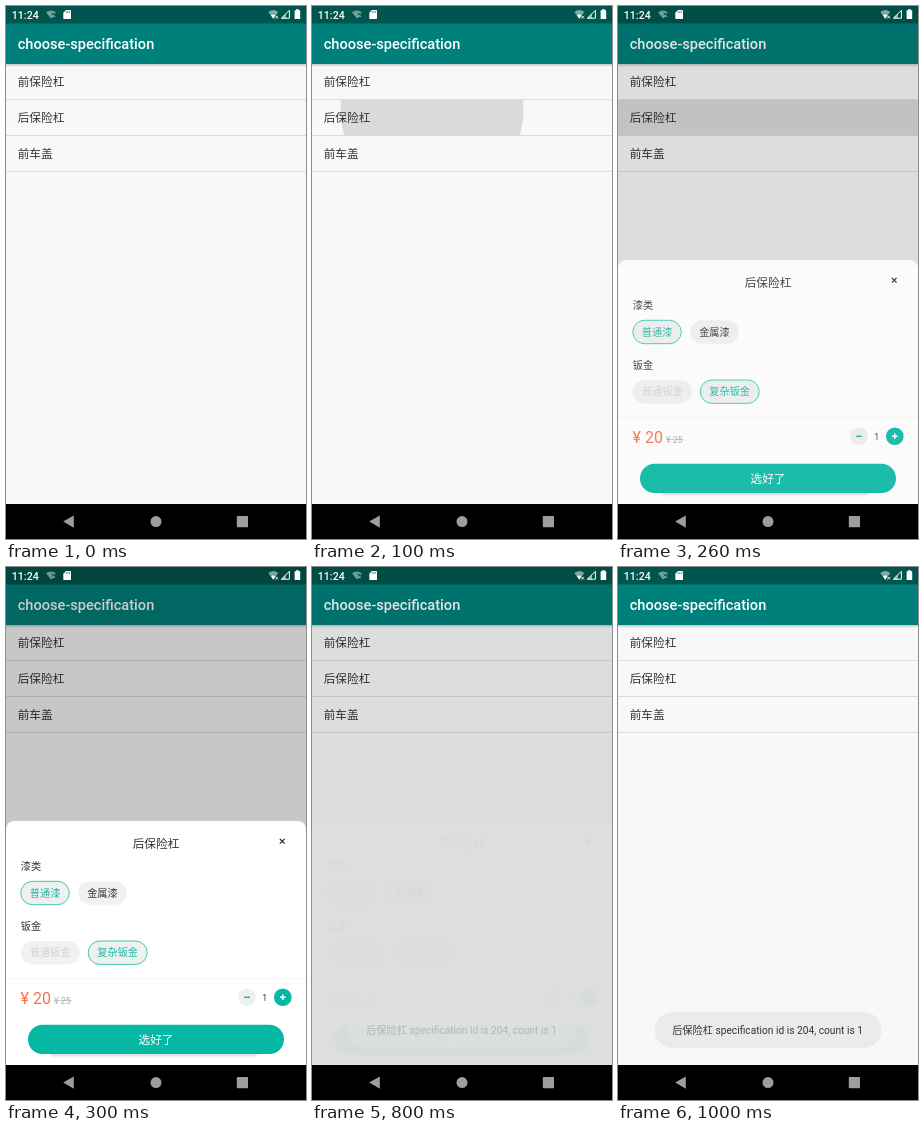
An HTML page that plays this animation: 300 px wide and 533 px high, repeating every 1100 ms.

```html
<!DOCTYPE html>
<html lang="zh-CN">
<head>
<meta charset="utf-8">
<title>choose-specification</title>
<style>
  html, body { margin: 0; width: 100%; height: 100%; overflow: hidden; background: #f8f8f8; }
  svg { display: block; width: 100vw; height: 100vh; }
  text { font-family: Roboto, "Noto Sans CJK SC", "Noto Sans CJK", sans-serif; font-size: 10.2px; fill: #333; }
  .item { font-size: 11.67px; }
  .bar { font-size: 14.6px; font-weight: 500; fill: #fff; }
  .clock { font-size: 10.6px; font-weight: 500; fill: #fff; }
  .mid { text-anchor: middle; }
  .chip rect { fill: #f1f1f1; }
  .chip.on rect { fill: #eef1f0; stroke: #04b8a4; stroke-width: .75; }
  .chip.on text { fill: #1fb5a2; }
  .chip.off text { fill: #d2d2d2; }
</style>
</head>
<body>
<svg viewBox="0 0 300 533" preserveAspectRatio="none">
  <defs>
    <clipPath id="row"><rect y="94" width="300" height="35.5"/></clipPath>
    <linearGradient id="shade" x2="0" y2="1">
      <stop stop-color="#000" stop-opacity=".2"/>
      <stop offset="1" stop-color="#000" stop-opacity="0"/>
    </linearGradient>
    <filter id="soft" x="-10%" y="-200%" width="120%" height="500%"><feGaussianBlur stdDeviation="1.6"/></filter>
  </defs>

  <rect width="300" height="533" fill="#f8f8f8"/>
  <g clip-path="url(#row)" fill="#d9dadb">
    <circle id="ripple" cx="120" cy="104" r="91.5"/>
    <rect id="press" y="94" width="300" height="36"/>
  </g>
  <path d="M0 93.6H300M0 129.5H300M0 165.4H300" stroke="#dcdcdc"/>
  <text class="item" x="11.7" y="80.2">前保险杠</text>
  <text class="item" x="11.7" y="116.1">后保险杠</text>
  <text class="item" x="11.7" y="152">前车盖</text>

  <rect y="58" width="300" height="3" fill="url(#shade)"/>
  <rect y="17" width="300" height="41" fill="#00807a"/>
  <rect width="300" height="17.5" fill="#00564e"/>
  <text class="bar" x="11.7" y="43.2">choose-specification</text>

  <rect id="dim" width="300" height="498"/>

  <text class="clock" x="5.8" y="12.8">11:24</text>
  <g fill="#fff">
    <path d="M40 6.2Q45 3 50 6.2L48 8.5L49.5 11H47L45 12.6Z" opacity=".45"/>
    <path d="M45.6 6.5L48.4 9.5M48.4 6.5L45.6 9.5" stroke="#00564e" stroke-width=".8"/>
    <path d="M60 4H64.3Q65 4 65 4.8V12.2Q65 13 64.3 13H58Q57.3 13 57.3 12.2V6.8Z"/>
    <path d="M60.2 5.2V6.8M61.8 5.2V6.8M63.4 5.2V6.8" stroke="#00564e" stroke-width=".7"/>
    <path d="M262.3 6Q267.3 2.2 272.3 6L267.3 12.8Z" opacity=".5"/>
    <path d="M265 9.3Q267.3 7.8 269.4 9.3L267.3 12.8Z"/>
    <path d="M269.3 9.8L272 12.6M272 9.8L269.3 12.6" stroke="#fff" stroke-width=".9"/>
    <path d="M275.4 12.2H283.4V4.4Z" fill="none" stroke="#fff" stroke-width="1"/>
    <path d="M275 12.6L280 7.6V12.6Z" opacity=".55"/>
    <path d="M290 3.2H292.8V4.2H294.2V13H288.6V4.2H290Z"/>
  </g>

  <g id="sheet">
    <path d="M0 498V263Q0 254 9 254H291Q300 254 300 263V498Z" fill="#fff"/>
    <text class="item mid" x="150" y="281.3">后保险杠</text>
    <path d="M273.8 271.8L278.6 276.6M278.6 271.8L273.8 276.6" stroke="#222" stroke-width="1.2"/>
    <text x="14.8" y="303.2">漆类</text>
    <text x="14.8" y="363.2">钣金</text>
    <g id="chips"></g>
    <path d="M0 411.8H300" stroke="#f4f4f4"/>

    <text x="14.6" y="437.4" style="font-size:16px;fill:#f5714f">¥ 20</text>
    <text x="48" y="436.7" style="font-size:8.75px;fill:#aaa">¥ 25</text>
    <path d="M48 433.6H65.3" stroke="#aaa" stroke-width=".7"/>
    <circle cx="241" cy="430.3" r="8.8" fill="#efefef"/>
    <path d="M238.2 430.3H243.8" stroke="#04b8a4" stroke-width="1.5"/>
    <text class="mid" x="258.6" y="433.5" style="font-size:8.75px">1</text>
    <circle cx="276.8" cy="430.3" r="8.8" fill="#04b8a4"/>
    <path d="M274 430.3H279.6M276.8 427.5V433.1" stroke="#fff" stroke-width="1.5"/>

    <rect x="44" y="484" width="207" height="5" rx="2.5" opacity=".16" filter="url(#soft)"/>
    <rect x="22" y="457.7" width="256" height="29.4" rx="14.7" fill="#04b8a4"/>
    <text class="item mid" x="150" y="476.8" style="fill:#fff">选好了</text>
  </g>

  <g id="toast">
    <rect x="36.7" y="445" width="226.8" height="36" rx="18" fill="#ebebeb"/>
    <text x="54.2" y="466.7">后保险杠 specification id is 204, count is 1</text>
  </g>

  <rect y="498" width="300" height="35"/>
  <g fill="#9e9e9e">
    <path d="M57.2 515.6L67.8 509.4V521.8Z"/>
    <circle cx="150" cy="515.6" r="5.5"/>
    <rect x="230.8" y="510" width="11.2" height="11.2" rx=".8"/>
  </g>
</svg>
<script>
  const chips = [
    [14.8, 314.3, 48.5, '普通漆', 'on'],
    [72.2, 314.3, 48.5, '金属漆', ''],
    [14.8, 374, 59, '普通钣金', 'off'],
    [82.2, 374, 59, '复杂钣金', 'on']
  ];
  document.getElementById('chips').innerHTML = chips.map(([x, y, w, label, state]) =>
    `<g class="chip ${state}"><rect x="${x}" y="${y}" width="${w}" height="23.4" rx="11.7"/>
     <text class="mid" x="${x + w / 2}" y="${y + 15.2}">${label}</text></g>`).join('');

  // Opacity of each part from the given time on, held until the next step
  const LOOP = 1100;
  const parts = ['ripple', 'press', 'dim', 'sheet', 'toast'];
  const steps = [
    [0,    0, 0, 0,   0,   0],
    [100,  1, 0, 0,   0,   0],
    [200,  0, 1, .11, .89, 0],
    [300,  0, 0, .2,  1,   0],
    [800,  0, 0, .11, .03, .22],
    [900,  0, 0, 0,   0,   .65],
    [1000, 0, 0, 0,   0,   1],
    [LOOP, 0, 0, 0,   0,   1]
  ];
  parts.forEach((id, i) => {
    const frames = steps.map(s => ({ offset: s[0] / LOOP, opacity: s[i + 1], easing: 'steps(1, end)' }));
    document.getElementById(id).animate(frames, { duration: LOOP, iterations: Infinity }).startTime = 0;
  });
</script>
</body>
</html>
```
